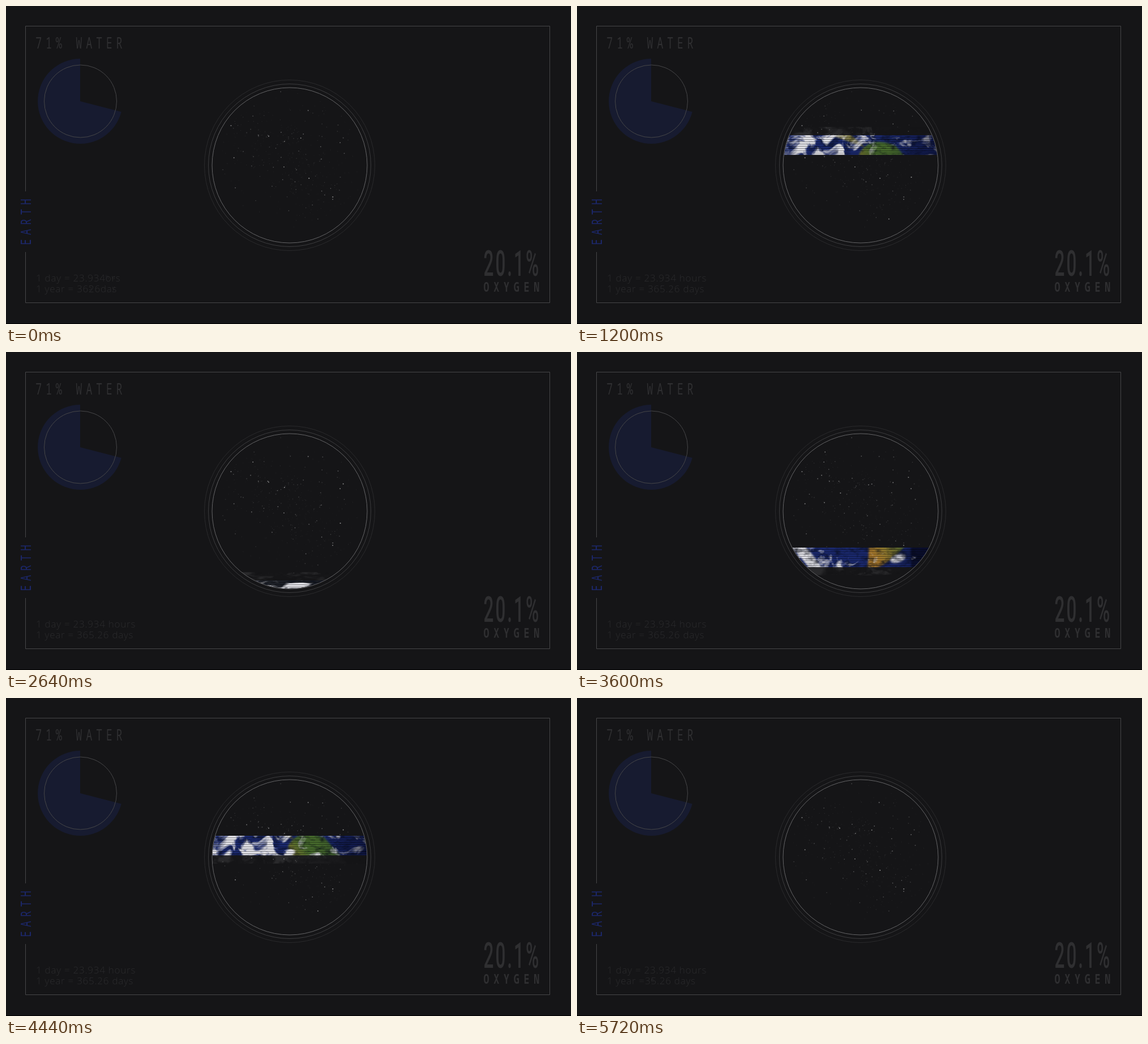
These frames come from a looping animation (998x561 px, 5.76 s). An HTML page with a canvas:

```html
<!DOCTYPE html>
<html lang="en">
<head>
<meta charset="utf-8">
<title>Earth</title>
<style>
  html, body { margin: 0; width: 100%; height: 100%; overflow: hidden; background: #151517; }
  canvas, svg { position: absolute; left: 0; top: 0; width: 998px; height: 561px; }
  .line { fill: none; stroke: #464648; }
  .label { font-family: "Noto Sans Mono", monospace; font-weight: 500; fill: #2f2f31; }
  .figure { font: 500 63px Roboto, sans-serif; letter-spacing: 6px; fill: #2f2f31; }
</style>
</head>
<body>
<canvas id="stage" width="998" height="561"></canvas>
<svg viewBox="0 0 998 561">
  <path class="line" d="M34.5 327V35.5H960.5V523.5H34.5V434"/>
  <path fill="#171b30" d="M131 168V93A75 75 0 1 0 203.7 186.7Z"/>
  <circle class="line" cx="131.5" cy="168" r="64"/>
  <g class="line">
    <circle cx="501" cy="281" r="137" stroke="#646466"/>
    <circle cx="501" cy="281" r="143.5" stroke="#3c3c3e"/>
    <circle cx="501" cy="281" r="150.5" stroke="#2a2a2c"/>
  </g>
  <text class="label" transform="translate(52.1 75) scale(.7 1)" font-size="26.6" letter-spacing="9.5">71% WATER</text>
  <text class="label" transform="translate(43.5 421.8) rotate(-90) scale(.7 1)" font-size="25.2" letter-spacing="10.3" style="fill:#1c2768">EARTH</text>
  <text class="figure" transform="translate(843.5 476) scale(.5 1)">20.1%</text>
  <text class="label" transform="translate(843.5 504) scale(.7 1)" font-size="23.8" letter-spacing="11.1" style="font-weight:700">OXYGEN</text>
  <path stroke="#000" d="M0 560.5H998"/>
</svg>
<script>
const LOOP = 5760, STEP = 40, W = 998, H = 561;
const CX = 501, CY = 281, R = 136.5;
const BAND = 34.5, TRAIL = 14.5;
const ctx = document.getElementById('stage').getContext('2d');

const hash = (x, y) => {
  const s = Math.sin(x * 127.1 + y * 311.7) * 43758.5453;
  return s - Math.floor(s);
};
const mix = (a, b, k) => a + (b - a) * k;
const clamp = v => Math.max(0, Math.min(1, v));

function noise(x, y) {
  const i = Math.floor(x), j = Math.floor(y);
  const ease = v => v * v * (3 - 2 * v);
  const u = ease(x - i), v = ease(y - j);
  return mix(mix(hash(i, j), hash(i + 1, j), u), mix(hash(i, j + 1), hash(i + 1, j + 1), u), v);
}

function fbm(x, y) {
  let sum = 0;
  for (let k = 0; k < 4; k++) sum += noise(x * 2 ** k, y * 2 ** k) * .53 / 2 ** k;
  return sum;
}

function layer() {
  const c = document.createElement('canvas');
  c.width = W;
  c.height = H;
  return c.getContext('2d');
}

function clipDisc(g) {
  g.beginPath();
  g.arc(CX, CY, R, 0, 7);
  g.clip();
}

// Fills the disc's square with one colour whose opacity follows a rule
function haze(color, opacity) {
  const g = layer(), size = 2 * R + 3, x0 = CX - R - 1, y0 = CY - R - 1;
  g.fillStyle = color;
  for (let y = y0 | 0; y < y0 + size; y++) for (let x = x0 | 0; x < x0 + size; x++) {
    g.globalAlpha = clamp(opacity(x, y));
    g.fillRect(x, y, 1, 1);
  }
  return g.canvas;
}

// Belts of cloud alternate with latitude and thin out to the east
function cloudCover(x, y) {
  const polar = y > 392;
  const warp = noise(x / 22, y / 22) * 18;
  const base = polar ? fbm((x + warp) / 40, (y + warp / 2) / 7) : fbm((x + warp) / 19, (y - warp) / 13);
  const belt = .1 * Math.cos((y - 250) / 25);
  const east = polar ? 0 : .16 * clamp((x - 500) / 40);
  return (base + belt - east - .52) * 5;
}

function paintEarth() {
  const g = layer();
  const shape = (color, d) => { g.fillStyle = color; g.fill(new Path2D(d)); };
  clipDisc(g);
  g.fillStyle = '#1a286c';
  g.fillRect(0, 0, W, H);
  g.filter = 'blur(1.5px)';
  const soil = g.createLinearGradient(514, 345, 562, 310);
  soil.addColorStop(0, '#a5762b');
  soil.addColorStop(.35, '#8a752d');
  soil.addColorStop(1, '#45682c');
  shape('#75703a', 'M410 175L510 165 470 215 510 250 455 230Z');
  shape(soil, 'M498 262Q515 228 562 246L606 295Q580 365 512 388Q522 320 498 262Z');
  shape('#0b1030', 'M590 340L640 325 590 388Z');
  shape('#1c1f26', 'M400 399H610V420H400Z');
  g.strokeStyle = '#dedee4';
  g.lineWidth = 19;
  g.stroke(new Path2D('M362 322Q400 345 428 392'));
  g.fillStyle = '#dedee4';
  for (const [x, y] of [[502, 333], [567, 364], [606, 331]]) {
    g.beginPath();
    g.ellipse(x, y, 14, 7, -.3, 0, 7);
    g.fill();
  }
  g.filter = 'none';
  g.drawImage(haze('#080c18', (x, y) => (fbm(x / 9, y / 5) - .42) * 1.5), 0, 0);
  g.drawImage(haze('#dedee4', cloudCover), 0, 0);
  const night = g.createLinearGradient(550, 0, 638, 0);
  night.addColorStop(0, 'rgba(6,9,35,0)');
  night.addColorStop(1, 'rgba(6,9,35,.6)');
  g.fillStyle = night;
  g.fillRect(550, 0, 90, 420);
  return g.canvas;
}

function toGray(source) {
  const g = layer();
  g.filter = 'grayscale(1)';
  g.drawImage(source, 0, 0);
  return g.canvas;
}

const earth = paintEarth(), grayEarth = toGray(earth);

// Most stars gather along a diagonal, the rest spread over the disc
const stars = Array.from({ length: 520 }, (_, i) => {
  const angle = hash(i, 1) * 2 * Math.PI;
  const r = 122 * Math.sqrt(hash(i, 2));
  const spread = i % 3 ? .5 : 1;
  const along = i % 3 ? (hash(i, 3) - .5) * 150 : 0;
  return {
    x: CX + along + r * spread * Math.cos(angle),
    y: CY - 10 + along * .8 + r * spread * Math.sin(angle),
    glow: .1 + .6 * hash(i, 4) ** 7,
    size: 1 + .7 * hash(i, 4) ** 7,
    speed: 2 + Math.floor(hash(i, 5) * 9)
  };
}).filter(s => Math.hypot(s.x - CX, s.y - CY) < 131);

function drawStars(t) {
  const phase = Math.floor((t + STEP) % LOOP / 80) * 80 / LOOP * Math.PI * 2;
  ctx.fillStyle = '#dcdcdc';
  stars.forEach((s, i) => {
    ctx.globalAlpha = s.glow * (.6 + .4 * Math.cos(phase * s.speed + i));
    ctx.fillRect(s.x - s.size / 2, s.y - s.size / 2, s.size, s.size);
  });
  ctx.globalAlpha = 1;
}

function drawBand(t) {
  const down = t < LOOP / 2;
  const y = Math.round(82.4 + 349.5 * (1 - Math.abs(t / (LOOP / 2) - 1)));
  const strip = (image, top, height, alpha) => {
    ctx.save();
    ctx.beginPath();
    ctx.rect(0, top, W, height);
    ctx.clip();
    ctx.globalAlpha = alpha;
    ctx.drawImage(image, 0, 0);
    ctx.restore();
  };
  strip(grayEarth, down ? y - TRAIL : y + BAND, TRAIL, .1);
  ctx.save();
  clipDisc(ctx);
  strip(earth, y, BAND, 1);
  ctx.fillStyle = 'rgba(0,0,0,.38)';
  for (let k = 3; k < BAND; k += 4) ctx.fillRect(364, y + k, 274, 1);
  ctx.restore();
}

const bursts = [1720, 2960, 5680];
const facts = ['1 day = 23.934 hours', '1 year = 365.26 days'];

// In a burst a window sweeps along the line and some of its letters collapse
function isCollapsed(t, row, i) {
  return bursts.some(start => {
    const k = (t - start + LOOP) % LOOP / STEP;
    const place = i - (k * 8 - 5);
    return k < 4 && place >= 0 && place < 8 && hash(i + row * 40, k) < .45;
  });
}

function drawFacts(t) {
  ctx.font = '300 17px "Open Sans", "Noto Sans", sans-serif';
  ctx.fillStyle = '#2b2b2d';
  facts.forEach((text, row) => {
    let x = 53;
    [...text].forEach((letter, i) => {
      const tiny = isCollapsed(t, row, i);
      ctx.save();
      ctx.translate(x, 486 + row * 18.7 - (tiny ? 4 : 0));
      if (tiny) ctx.scale(.6, .6);
      ctx.fillText(letter, 0, 0);
      ctx.restore();
      if (!tiny) x += ctx.measureText(letter).width + .75;
    });
  });
}

function draw() {
  const t = Math.floor(performance.now() / STEP) * STEP % LOOP;
  ctx.fillStyle = '#151517';
  ctx.fillRect(0, 0, W, H);
  drawStars(t);
  drawBand(t);
  drawFacts(t);
  requestAnimationFrame(draw);
}
draw();
</script>
</body>
</html>
```
